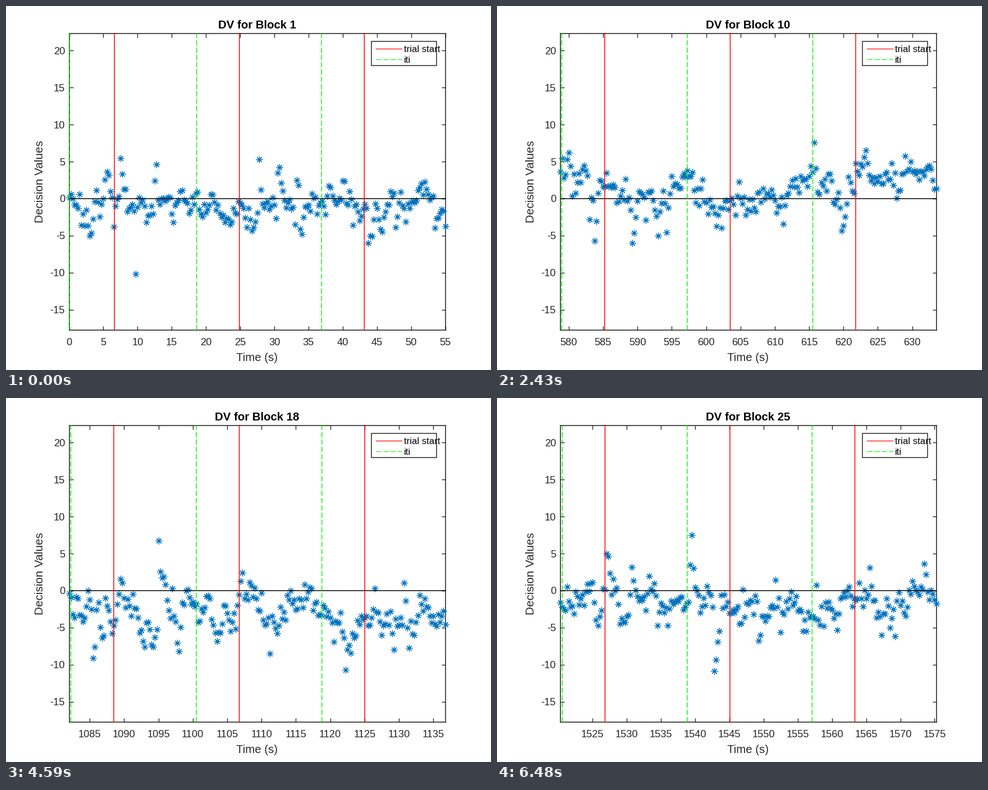
Recreate the animation shown at these times as a matplotlib script. Size 864 by 648 pixels, loop 6.75 s.

```python
import numpy as np
import matplotlib.pyplot as plt
from matplotlib.animation import FuncAnimation
from matplotlib.patches import Rectangle

W, H, DPI = 864, 648, 72  # at 72 dpi one point is one pixel
plt.rcParams.update({
    "font.family": "Liberation Sans",
    "axes.unicode_minus": False,
    "lines.scale_dashes": False,
})

INK, BLUE, RED, GREEN = "#262626", "#0072bd", "#ff0000", "#00ff00"
DASH = (0, (9, 4))
LEFT, RIGHT, TOP, BOTTOM = 112.5, 782.5, 48.5, 577
STEP, TRIAL, ONSET = 0.25, 18.27, 6.25

# Session outline, interpolated over the blocks:
# block, start time (s), delay to first iti (s), mean decision value
KEYS = np.array([
    (1, 0, 0.37, -1.0),
    (3, 130.25, 0.31, 0.5),
    (4, 195, 0.2, 1.8),
    (7, 391.5, 0.33, 0.0),
    (12, 703.25, 0.17, 3.0),
    (15, 897.5, 0.38, -2.6),
    (20, 1205, 0.15, -3.4),
    (21, 1270, 0.31, -3.0),
    (22, 1330.5, 0.31, -2.8),
    (25, 1520.25, 0.31, -2.2),
])


def outline(block):
    start, phase, mean = (np.interp(block, KEYS[:, 0], col)
                          for col in KEYS[:, 1:].T)
    start = np.ceil(start / STEP) * STEP
    width = 54.75 if phase < 0.25 else 55
    return start, width, phase, mean


def decision_values(block, t, mean):
    """Slow waves plus heavy-tailed, autocorrelated noise, livelier early on."""
    rng = np.random.default_rng(block)
    y = np.full(t.size, mean)
    for period in (45, 16):
        y += rng.uniform(0.6, 1.4) * np.sin(
            2 * np.pi * (t / period + rng.uniform()))
    kicks = 1.1 * rng.standard_t(4, t.size) * (1 + 0.8 * np.exp(-t / 4))
    drift = 0
    for i, kick in enumerate(kicks):
        drift = 0.6 * drift + kick
        y[i] += drift
    return np.clip(y, -17.2, 21.8)


fig = plt.figure(figsize=(W / DPI, H / DPI), dpi=DPI, facecolor="white")
ax = fig.add_axes([LEFT / W, 1 - BOTTOM / H, (RIGHT - LEFT) / W,
                   (BOTTOM - TOP) / H])
ax.set_ylim(-17.76, 22.34)
ax.set_yticks(range(-15, 21, 5))
ax.tick_params(direction="in", top=True, right=True, length=7, width=1.4,
               color=INK, labelcolor=INK, labelsize=18.3)
ax.tick_params(axis="x", pad=14)
ax.tick_params(axis="y", pad=7.5)
ax.xaxis.set_major_formatter("{x:.0f}")
for spine in ax.spines.values():
    spine.set(color=INK, linewidth=1.6)

points, = ax.plot([], [], ls="", marker=(8, 2, 0), ms=12, mec=BLUE, mew=1.2,
                  clip_on=False, snap=False, zorder=2.6)
ax.axhline(0, color="black", lw=1.5, snap=False, zorder=2.8)


def markers(color, style="-"):
    return [ax.axvline(0, color=color, ls=style, lw=1.5, snap=False,
                       clip_on=False, zorder=3) for _ in range(3)]


starts = markers(RED)
itis = markers(GREEN, DASH)

# Overlay in pixel coordinates for the legend and the captions
px = fig.add_axes([0, 0, 1, 1], zorder=5)
px.set(xlim=(0, W), ylim=(H, 0))
px.axis("off")


def label(x, y, s, size, color=INK, ha="center", **kw):
    return px.text(x, y, s, fontsize=size, color=color, ha=ha, va="baseline",
                   rotation_mode="anchor", **kw)


px.add_patch(Rectangle((651, 63), 116, 43, fc="white", ec=INK, lw=1.5))
for y, name, color, style in ((75.5, "trial start", RED, "-"),
                              (94.5, "iti", GREEN, DASH)):
    px.plot([659, 705], [y, y], color=color, lw=1.2, ls=style)
    label(709, y + 6.5, name, 16.8, "black", ha="left")

title = label(447, 40, "", 20.4, "black", weight="bold")
label(447.5, 632, "Time (s)", 20.4)
label(66, 312.5, "Decision Values", 20.6, rotation=90)


def draw(i):
    block = i + 1
    t0, width, phase, mean = outline(block)
    t = np.arange(0, width + STEP / 2, STEP)
    points.set_data(t0 + t, decision_values(block, t, mean))
    for k in range(3):
        at = t0 + phase + k * TRIAL
        starts[k].set_xdata([at + ONSET] * 2)
        # the session opens with an iti at time zero
        itis[k].set_xdata([at if at > 1 else 0] * 2)
    ax.set_xlim(t0, t0 + width)
    ax.set_xticks(np.arange(5 * np.ceil(t0 / 5), t0 + width + 0.01, 5))
    title.set_text(f"DV for Block {block}")
    return [points, title, *starts, *itis]


anim = FuncAnimation(fig, draw, frames=25, interval=270, repeat=True,
                     repeat_delay=0, blit=False)
plt.show()
```
